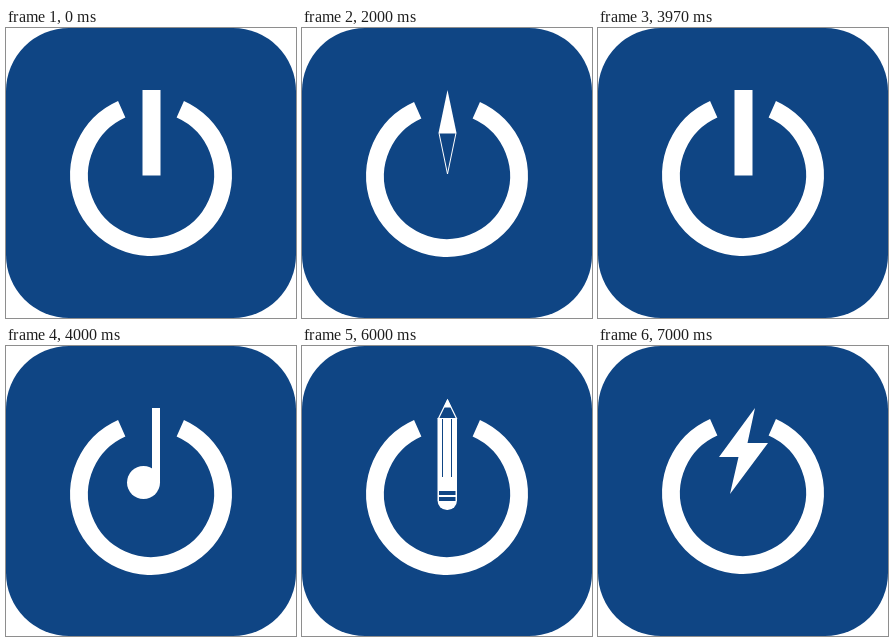
An HTML page with a canvas that plays this animation: 290 by 290 pixels, repeating every 8 s.

```html
<!DOCTYPE html>
<html>
<head>
<meta charset="utf-8">
<style>
html, body { margin: 0; width: 100%; height: 100%; overflow: hidden; background: #fff; }
canvas { display: block; }
</style>
</head>
<body>
<canvas id="stage" width="290" height="290"></canvas>
<script>
const ctx = document.getElementById('stage').getContext('2d');
const BLUE = '#0f4584', WHITE = '#fff', TAU = Math.PI * 2;

function path(points) {
  ctx.beginPath();
  points.forEach(([x, y]) => ctx.lineTo(x, y));
  ctx.closePath();
}

function rect(x, y, w, h, color = WHITE) {
  ctx.fillStyle = color;
  ctx.fillRect(x, y, w, h);
}

function disc(x, y, r) {
  ctx.beginPath();
  ctx.arc(x, y, r, 0, TAU);
  ctx.fill();
}

function outline(width) {
  ctx.lineWidth = width;
  ctx.stroke();
}

function ring(cy) {
  const gap = 24 * Math.PI / 180, top = -Math.PI / 2;
  ctx.beginPath();
  ctx.arc(145, cy, 72, top + gap, top - gap + TAU);
  outline(18);
}

function bar(y) {
  rect(136.5, y, 18, 85.5);
}

function star(cx, cy, r) {
  path(Array.from({ length: 10 }, (_, i) => {
    const a = i * Math.PI / 5, d = i % 2 ? r * 0.42 : r;
    return [cx + d * Math.sin(a), cy - d * Math.cos(a)];
  }));
  outline(2);
}

function power() {
  ring(147);
  bar(62);
}

function record() {
  for (let r = 17.5; r < 79; r += 4) {
    ctx.beginPath();
    ctx.arc(145, 147.5, r, 0, TAU);
    outline(1.1);
  }
  ring(147);
  disc(145, 148, 4);
  bar(63);
}

function compass() {
  ring(148);
  path([[145.5, 62], [154.5, 105], [136.5, 105]]);
  ctx.fill();
  path([[137, 105], [154, 105], [145.5, 146]]);
  outline(1);
}

function night() {
  ctx.beginPath();
  ctx.arc(122, 129, 65, -0.6, 1.96);
  outline(2.5);
  star(105, 151, 17);
  star(160, 117, 17);
  ring(147);
  bar(61);
}

function note() {
  ring(148);
  rect(146, 62, 8, 75);
  disc(137.5, 136.5, 16.5);
}

function pencil() {
  ring(148);
  path([[145.5, 54], [154.5, 72.5], [136.5, 72.5]]);
  outline(1.2);
  path([[145.5, 53], [149.5, 61.5], [141.5, 61.5]]);
  ctx.fill();
  ctx.beginPath();
  ctx.roundRect(135.5, 72, 19.5, 92, [0, 0, 9.5, 9.5]);
  ctx.fill();
  rect(140, 73, 1, 58, BLUE);
  rect(149, 73, 1, 58, BLUE);
  rect(137, 145, 16.5, 4, BLUE);
  rect(137, 151, 16.5, 4, BLUE);
}

function bolt() {
  ring(147);
  path([[157, 62], [121, 111], [140.5, 111], [132, 148], [170, 97], [149.5, 97]]);
  ctx.fill();
}

// Each scene runs from its start time (ms) until the next one begins.
const scenes = [
  [0, power], [1000, record], [2000, compass], [3000, night], [3970, power],
  [4000, note], [5000, power], [6000, pencil], [6970, power], [7000, bolt]
];

function draw(now) {
  const t = now % 8000;
  ctx.clearRect(0, 0, 290, 290);
  ctx.fillStyle = BLUE;
  ctx.beginPath();
  ctx.roundRect(0, 0, 290, 290, 63);
  ctx.fill();
  ctx.fillStyle = ctx.strokeStyle = WHITE;
  scenes.findLast(([start]) => t >= start)[1]();
  requestAnimationFrame(draw);
}

const begin = performance.now();
(function tick() {
  draw = (paint => () => paint(Math.max(0, performance.now() - begin)))(draw);
  draw();
})();
</script>
</body>
</html>
```
